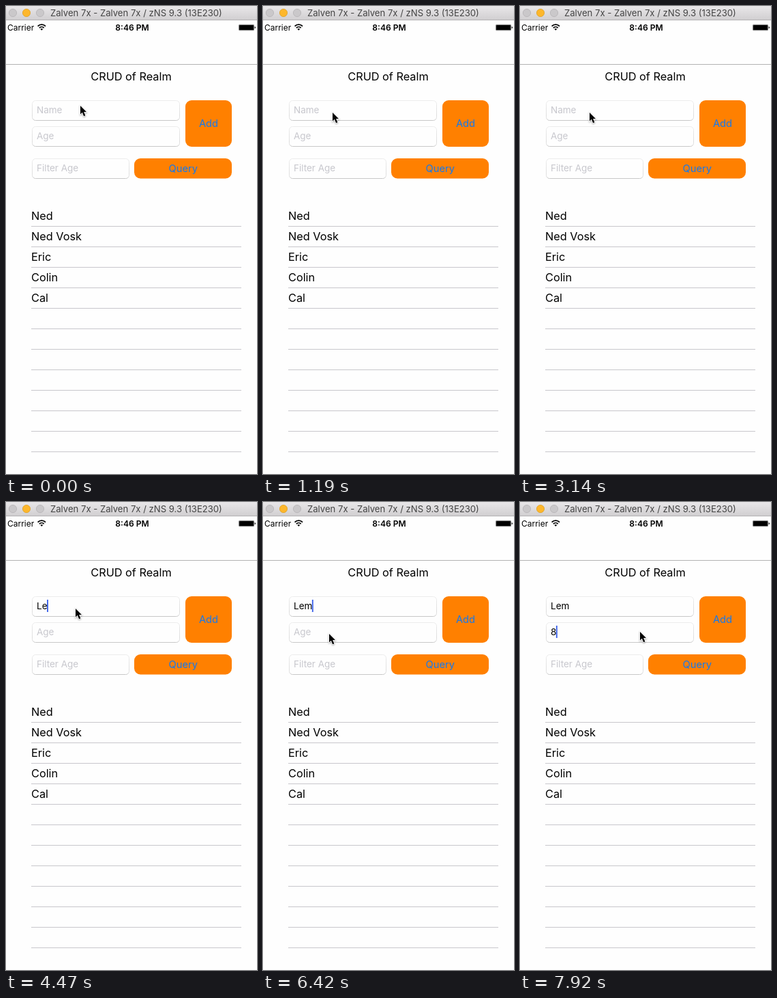
These frames come from a looping animation (368 px wide and 685 px high, 8 s). An HTML page:

```html
<!DOCTYPE html>
<html lang="en">
<head>
<meta charset="utf-8">
<title>CRUD form</title>
<style>
  html, body { margin: 0; width: 100%; height: 100%; overflow: hidden; background: #fefefe; }
  svg { display: block; width: 100vw; height: 100vh; }
  text { font: 13.5px Inter, Roboto, sans-serif; white-space: pre; }
  .mid { text-anchor: middle; }
  .bar { font-size: 13.1px; fill: #444; }
  .status { font-size: 12px; }
  .clock { font-size: 12.1px; font-weight: 600; }
  .big { font-size: 16.3px; }
  .btn { font-size: 14.7px; fill: #1279f0; }
  .hint { fill: #c7c7cd; }
  .field { fill: #fefefe; stroke: url(#edge); }
  .orange { fill: #ff8000; }
</style>
</head>
<body>
<svg viewBox="0 0 368 685">
  <defs>
    <linearGradient id="chrome" x2="0" y2="1">
      <stop stop-color="#e9e7e9"/><stop offset="1" stop-color="#d1cfd1"/>
    </linearGradient>
    <linearGradient id="edge" x2="0" y2="1">
      <stop stop-color="#ececec"/><stop offset=".9" stop-color="#dcdcdc"/><stop offset="1" stop-color="#c8c8c8"/>
    </linearGradient>
  </defs>
  <rect width="368" height="685" fill="#fefefe"/>

  <rect width="368" height="20" fill="url(#chrome)"/>
  <path d="M0 20.5H368" stroke="#b4b2b4"/>
  <g stroke-width=".8">
    <circle cx="10" cy="10" r="5.6" fill="#cac8ca" stroke="#b5b3b5"/>
    <circle cx="30" cy="10" r="5.6" fill="#fdb72c" stroke="#dfa023"/>
    <circle cx="50" cy="10" r="5.6" fill="#cac8ca" stroke="#b5b3b5"/>
  </g>
  <text class="bar" x="65" y="15">Zalven 7x - Zalven 7x / zNS 9.3 (13E230)</text>

  <text class="status" x="2" y="35.5">Carrier</text>
  <g fill="none" stroke="#000" stroke-width="1.8">
    <path d="M46.6 29.6a8 8 0 0 1 11.4 0M48.9 32a4.9 4.9 0 0 1 6.8 0"/>
    <path d="M52.3 35.8L50.4 33.8a2.8 2.8 0 0 1 3.8 0Z" fill="#000" stroke="none"/>
  </g>
  <text class="clock mid" x="185" y="35.5">8:46 PM</text>
  <rect x="341.3" y="27.3" width="22.4" height="8.4" rx="1.5" fill="none" stroke="#000" stroke-width=".5"/>
  <rect x="342" y="28" width="21" height="7" rx=".6"/>
  <path d="M364.6 30v3q1.4-.4 1.4-1.5t-1.4-1.5Z"/>

  <path d="M0 85.5H368" stroke="#b2b2b2"/>
  <text class="big mid" x="183.5" y="109">CRUD of Realm</text>

  <rect class="field" x="38.5" y="138.5" width="216" height="29" rx="5"/>
  <rect class="field" x="38.5" y="176.5" width="216" height="29" rx="5"/>
  <rect class="field" x="38.5" y="223.5" width="142" height="29" rx="5"/>
  <rect class="orange" x="263" y="138" width="68" height="68" rx="9"/>
  <rect class="orange" x="188" y="223" width="143" height="29.5" rx="9"/>
  <text class="btn mid" x="297" y="177.3">Add</text>
  <text class="btn mid" x="259.8" y="243">Query</text>

  <text id="name" x="45" y="157.3"></text>
  <text id="age" x="45" y="195.3"></text>
  <text class="hint" x="45" y="242.3">Filter Age</text>
  <g id="list"></g>
  <rect id="caret" width="1.9" height="18" fill="#3d63ea"/>
  <path id="arrow" d="M0 0V12.4L2.8 9.8 5.1 15.2 7.4 14.2 5.1 9H9Z" stroke="#fff" stroke-width="1.6" paint-order="stroke"
    style="filter:drop-shadow(0 1px 1px #0005)"/>
</svg>
<script>
const $ = id => document.getElementById(id);
const LOOP = 8000, STEP = 149.4, BLINK = 1010;

// User actions: a click focuses a field, a key adds a letter to it.
const actions = [
  { at: 400, field: "name", key: "" },
  { at: 4160, field: "name", key: "L" },
  { at: 4460, field: "name", key: "e" },
  { at: 4905, field: "name", key: "m" },
  { at: 6700, field: "age", key: "" },
  { at: 7745, field: "age", key: "8" },
];

// Pointer stops, eased in between.
const stops = [
  { at: 0, x: 109, y: 146 },
  { at: 740, x: 102, y: 156 },
  { at: 5840, x: 102, y: 156 },
  { at: 6270, x: 97, y: 210 },
  { at: 6400, x: 97, y: 193 },
  { at: 7750, x: 97, y: 193 },
  { at: 7895, x: 176, y: 190 },
];

const clamp = v => Math.min(1, Math.max(0, v));
const ease = p => p * p * (3 - 2 * p);

function pointer(t) {
  const i = Math.max(1, stops.findIndex(s => s.at > t));
  const [a, b] = t >= stops.at(-1).at ? stops.slice(-2) : [stops[i - 1], stops[i]];
  const p = ease(clamp((t - a.at) / (b.at - a.at)));
  return [a.x + (b.x - a.x) * p, a.y + (b.y - a.y) * p];
}

// Solid just after an action, then a soft periodic blink.
function blink(since) {
  const phase = (Math.max(since, 300) - 825) / BLINK;
  return clamp(.5 - 1.5 * Math.cos(2 * Math.PI * phase));
}

const people = ["Ned", "Ned Vosk", "Eric", "Colin", "Cal"];
$("list").innerHTML = Array.from({ length: 12 }, (_, i) => {
  const y = 322.5 + 30 * i;
  return `<path d="M37 ${y}H345" stroke="#c8c7cc"/><text class="big" x="37" y="${y - 9.5}">${people[i] || ""}</text>`;
}).join("");

function fill(id, value, hint) {
  $(id).textContent = value || hint;
  $(id).setAttribute("class", value ? "" : "hint");
}

function draw(t) {
  const done = actions.filter(a => a.at <= t), last = done.at(-1);
  const typed = field => done.filter(a => a.field === field).map(a => a.key).join("");
  fill("name", typed("name"), "Name");
  fill("age", typed("age"), "Age");

  const caret = $("caret");
  caret.setAttribute("opacity", last ? blink(t - last.at) : 0);
  if (last) {
    const { field } = last;
    caret.setAttribute("x", 45 + (typed(field) ? $(field).getComputedTextLength() - .5 : 0));
    caret.setAttribute("y", field === "name" ? 143 : 181);
  }
  $("arrow").setAttribute("transform", `translate(${pointer(t)})`);
}

const begin = performance.now();
function tick() {
  const t = (performance.now() - begin) % LOOP;
  // The screen refreshes in coarse steps.
  draw(130 + Math.floor((t - 130) / STEP) * STEP);
  requestAnimationFrame(tick);
}
tick();
</script>
</body>
</html>
```
